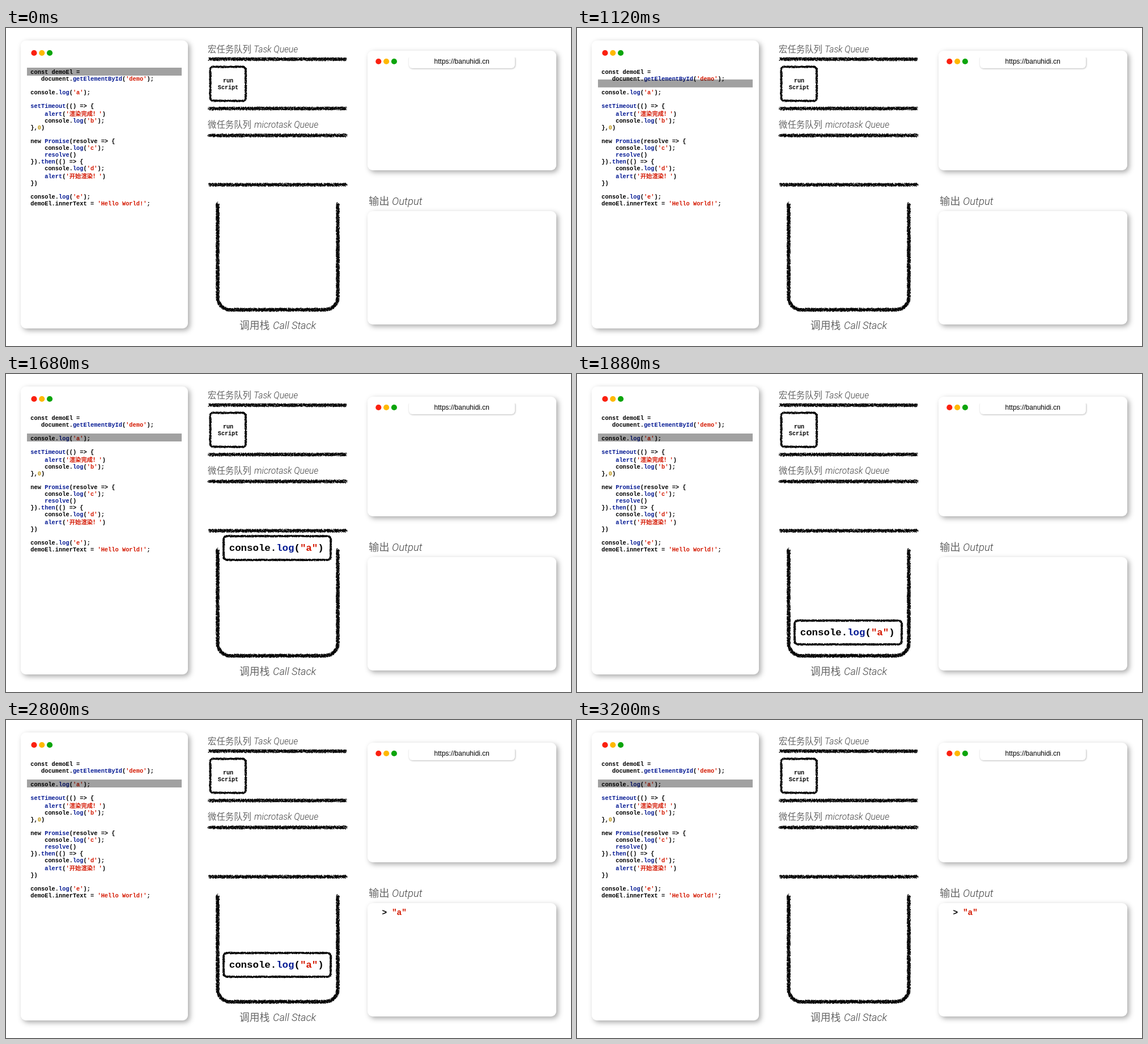
Animation of 997 by 561 pixels, one loop 3680 ms. Source, as an HTML page with a canvas:

```html
<!DOCTYPE html>
<html lang="zh">
<head>
<meta charset="utf-8">
<style>
html, body { margin: 0; width: 100%; height: 100%; overflow: hidden; background: #fff; }
canvas { display: block; }
</style>
</head>
<body>
<canvas id="stage" width="997" height="561"></canvas>
<script>
const W = 997, H = 561, LOOP = 3680;
const MONO = '"Liberation Mono", "Noto Sans CJK SC", "Noto Sans CJK", monospace';
const CJK = '"Noto Sans CJK SC Light", "Noto Sans CJK SC", "Noto Sans CJK", sans-serif';
const RED = '#d41800', BLUE = '#061b94', GOLD = '#bd9410';

const stage = document.getElementById('stage').getContext('2d');

function layer(w, h) {
  const c = document.createElement('canvas');
  c.width = w;
  c.height = h;
  return c.getContext('2d');
}

let seed = 7;
function rand() {
  seed = (seed * 16807) % 2147483647;
  return seed / 2147483647;
}

// Rough charcoal stroke: random specks scattered around a path
function charcoal(g, d, radius) {
  const path = document.createElementNS('http://www.w3.org/2000/svg', 'path');
  path.setAttribute('d', d);
  const length = path.getTotalLength();
  g.fillStyle = '#000';
  for (let s = 0; s < length; s += 0.5) {
    const p = path.getPointAtLength(s);
    for (let i = 0; i < radius * 1.3; i++) {
      const a = rand() * Math.PI * 2, r = radius * Math.sqrt(rand());
      g.fillRect(p.x + Math.cos(a) * r - 0.6, p.y + Math.sin(a) * r - 0.6, 1.2, 1.2);
    }
  }
}

function sketchBox(g, x, y, w, h, r) {
  g.fillStyle = '#fff';
  g.beginPath();
  g.roundRect(x, y, w, h, r);
  g.fill();
  charcoal(g, `M${x + r} ${y}h${w - 2 * r}a${r} ${r} 0 0 1 ${r} ${r}v${h - 2 * r}` +
    `a${r} ${r} 0 0 1 ${-r} ${r}h${2 * r - w}a${r} ${r} 0 0 1 ${-r} ${-r}v${2 * r - h}` +
    `a${r} ${r} 0 0 1 ${r} ${-r}`, 1.8);
}

function text(g, str, x, y, font, color = '#000', align = 'left') {
  g.font = font;
  g.fillStyle = color;
  g.textAlign = align;
  g.fillText(str, x, y);
}

function code(g, str, x, y, size) {
  const font = `bold ${size}px ${MONO}`;
  for (const { 0: part, index } of str.matchAll(/'[^']*'|"[^"]*"|\w+|[^\w'"]/g)) {
    const called = str[index + part.length] === '(';
    const color = /^['"]/.test(part) ? RED
      : /^\d/.test(part) ? GOLD
      : /^\w/.test(part) && called ? BLUE : '#000';
    text(g, part, x, y, font, color);
    x += g.measureText(part).width;
  }
}

function panel(g, x, y, w, h, r, offset, blur, alpha) {
  g.save();
  g.shadowColor = `rgba(0,0,0,${alpha})`;
  g.shadowOffsetX = g.shadowOffsetY = offset;
  g.shadowBlur = blur;
  g.fillStyle = '#fff';
  g.beginPath();
  g.roundRect(x, y, w, h, r);
  g.fill();
  g.restore();
}

function lights(g, x, y) {
  ['#fb2010', '#ffb800', '#0ba50b'].forEach((color, i) => {
    g.fillStyle = color;
    g.beginPath();
    g.arc(x + i * 13.8, y, 5.1, 0, 7);
    g.fill();
  });
}

function title(g, zh, x, en, enX, y, size) {
  text(g, zh, x, y, `300 ${size}px ${CJK}`, '#666');
  text(g, en, enX, y, `italic 300 ${size + 0.3}px Roboto, "Liberation Sans", sans-serif`, '#444');
}

function drawScene(g) {
  g.fillStyle = '#fff';
  g.fillRect(0, 0, W, H);
  panel(g, 26, 22, 295, 508, 9, 3.5, 10, 0.34);
  panel(g, 638, 40, 333, 211, 9, 3.5, 10, 0.34);
  panel(g, 638, 323, 333, 200, 9, 3.5, 10, 0.34);
  panel(g, 711, 48, 187, 23, 6, 0.7, 3, 0.3);
  g.fillStyle = '#fff';
  g.fillRect(708, 44, 193, 8);
  lights(g, 49.5, 44);
  lights(g, 657.3, 59);
  text(g, 'https://banuhidi.cn', 804.3, 63, '12px "Liberation Sans", sans-serif', '#000', 'center');

  [
    [81, 'const demoEl ='],
    [93, "   document.getElementById('demo');"],
    [117, "console.log('a');"],
    [141, 'setTimeout(() => {'],
    [155, "    alert('渲染完成！')"],
    [167, "    console.log('b');"],
    [179, '},0)'],
    [203, 'new Promise(resolve => {'],
    [215, "    console.log('c');"],
    [227, '    resolve()'],
    [239, '}).then(() => {'],
    [251, "    console.log('d');"],
    [265, "    alert('开始渲染！')"],
    [277, '})'],
    [301, "console.log('e');"],
    [313, "demoEl.innerText = 'Hello World!';"]
  ].forEach(([y, line]) => code(g, line, 43.3, y, 10.37));

  title(g, '宏任务队列', 356, 'Task Queue', 437, 42.5, 15.4);
  title(g, '微任务队列', 356, 'microtask Queue', 438, 176.3, 15.4);
  title(g, '调用栈', 412, 'Call Stack', 471, 530.5, 17.8);
  title(g, '输出', 640, 'Output', 681, 312.3, 18.3);

  for (const y of [55, 142, 189.5, 276.5]) charcoal(g, `M358.5 ${y}H600.5`, 3);
  charcoal(g, 'M373.5 310V475a22 22 0 0 0 22 22H563.5a22 22 0 0 0 22 -22V310', 3.1);

  sketchBox(g, 360.5, 68.5, 62.5, 60, 5);
  text(g, 'run', 392, 96.3, `bold 10.1px ${MONO}`, '#000', 'center');
  text(g, 'Script', 392, 107.6, `bold 10.1px ${MONO}`, '#000', 'center');
}

const scene = layer(W, H);
drawScene(scene);

const call = layer(200, 50);
sketchBox(call, 5, 4, 189, 42, 6);
code(call, 'console.log("a")', 14.7, 30, 17.4);

const progress = (t, start, length) => Math.min(1, Math.max(0, (t - start) / length));
const easeIn = p => 1 - Math.cos(p * Math.PI / 2);
const easeOut = p => Math.sin(p * Math.PI / 2);
const easeInOut = p => (1 - Math.cos(p * Math.PI)) / 2;

const TOP = -38, REST = 464;

function draw(t) {
  stage.drawImage(scene.canvas, 0, 0);

  const barY = 70 + 35 * easeInOut(progress(t, 740, 680));
  stage.fillStyle = 'rgba(0,0,0,.37)';
  stage.fillRect(37, barY, 273, 14);

  stage.globalAlpha = progress(t, 2080, 320);
  code(stage, '> "a"', 663.5, 344.3, 14.5);
  stage.globalAlpha = 1;

  const y = TOP + (REST - TOP) *
    (easeOut(progress(t, 1442, 496)) - easeIn(progress(t, 2687, 496)));
  stage.drawImage(call.canvas, 379, Math.round(y) - 25);
}

const begin = performance.now();
function tick() {
  draw((performance.now() - begin) % LOOP);
  requestAnimationFrame(tick);
}
tick();
</script>
</body>
</html>
```
